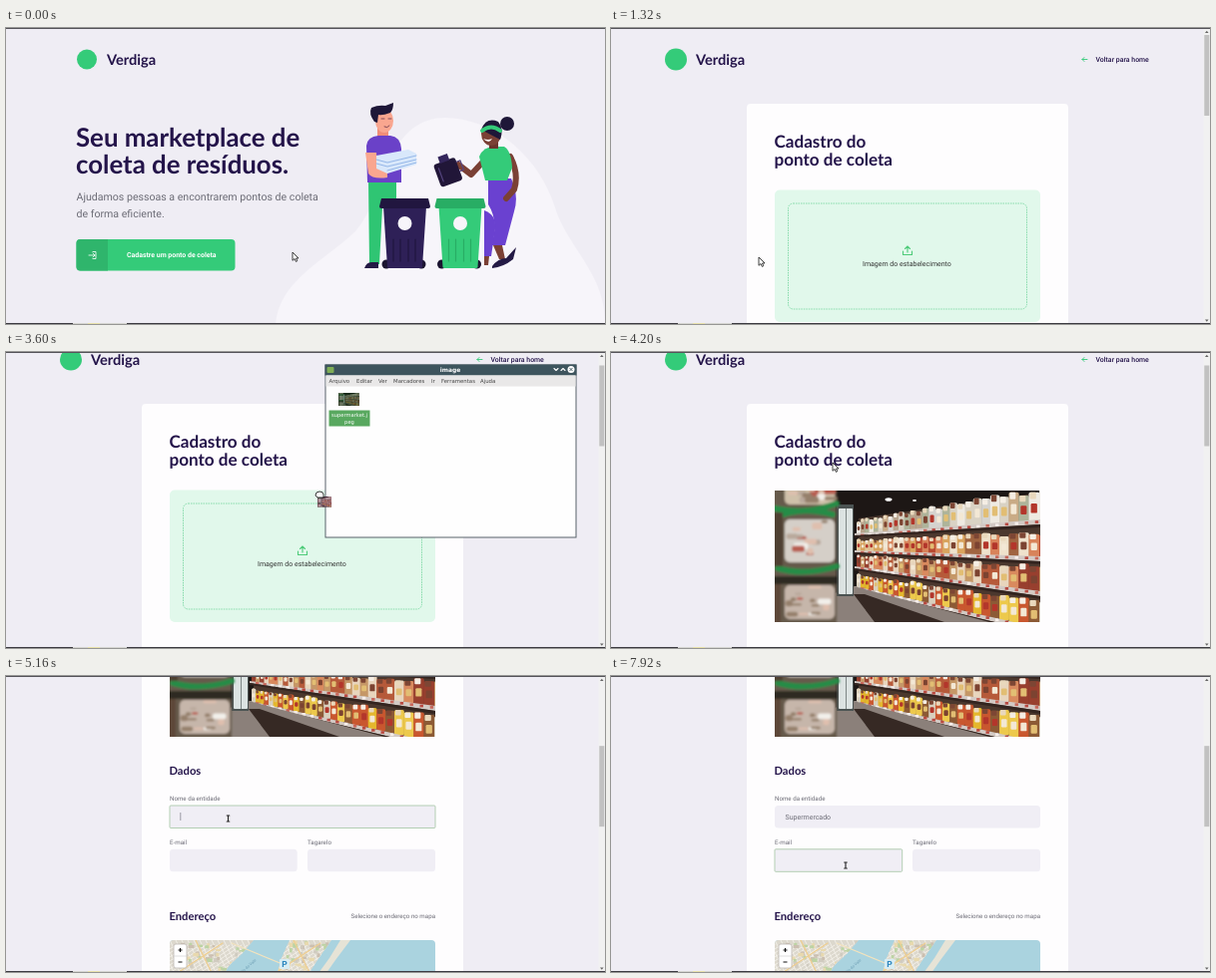
Write an HTML page that moves like this. It is 600 px wide and 297 px high and loops after 8000 ms.

```html
<!DOCTYPE html>
<html lang="pt-BR">
<head>
<meta charset="utf-8">
<title>Ponto de coleta</title>
<style>
  html, body { margin: 0; width: 100%; height: 100%; overflow: hidden; background: #efedf4; }
  svg { display: block; width: 600px; height: 297px; }
  text { font-family: Roboto, sans-serif; font-size: 7px; fill: #6c6c76; white-space: pre; text-rendering: geometricPrecision; }
  .title { font-family: Lato, sans-serif; font-weight: 700; fill: #24144a; }
  .brand { font-size: 14.6px; }
  .hero { font-size: 25.8px; }
  .h1 { font-size: 17.1px; }
  .h2 { font-size: 11.2px; }
  .lead { font-size: 10.6px; }
  .label { font-size: 6.2px; }
  .back { font-weight: 500; font-size: 6.95px; fill: #24144a; }
  .menu text { font-family: "DejaVu Sans", sans-serif; font-size: 5.4px; fill: #444; }
  .menu .name { font-size: 5.2px; fill: #fff; text-anchor: middle; }
  .menu .bar { font-size: 6px; font-weight: 700; fill: #fff; text-anchor: middle; }
  .field { fill: #f0eef5; stroke: none; rx: 3.5px; }
  .field.focus { stroke: #b3ceb3; stroke-width: 1; rx: 1px; }
  .line { fill: none; stroke-linecap: round; stroke-linejoin: round; }
</style>
</head>
<body>
<svg viewBox="0 0 600 297">
  <defs>
    <clipPath id="photoClip"><rect width="266" height="132"/></clipPath>
    <clipPath id="mapClip"><rect width="266" height="132" rx="4"/></clipPath>
    <filter id="soft"><feGaussianBlur stdDeviation="1.3"/></filter>
    <g id="photo" clip-path="url(#photoClip)"></g>
  </defs>
  <rect width="600" height="297" fill="#efedf4"/>

  <g id="home">
    <path d="M270 297C274 252 322 232 350 204C380 172 378 91 440 90C492 91 535 132 550 180C562 220 600 245 600 297Z" fill="#f7f5fa"/>
    <circle cx="81" cy="31.5" r="10" fill="#34cb79"/>
    <text class="title brand" x="101" y="36.5">Verdiga</text>
    <text class="title hero" x="70" y="119">Seu marketplace de</text>
    <text class="title hero" x="70" y="146">coleta de resíduos.</text>
    <text class="lead" x="70.5" y="173">Ajudamos pessoas a encontrarem pontos de coleta</text>
    <text class="lead" x="70.5" y="189.5">de forma eficiente.</text>
    <rect id="button" x="70.5" y="212" width="159" height="31.5" rx="4" fill="#34cb79"/>
    <path d="M102 212H74.5a4 4 0 0 0-4 4v23.5a4 4 0 0 0 4 4H102Z" fill="#2fb56c"/>
    <path class="line" d="M83 228h6m-2-2 2 2-2 2M87 224.5h3v7h-3" stroke="#fff" stroke-width=".8"/>
    <text x="121" y="230.3" style="font-size:6.95px;font-weight:700;fill:#fff">Cadastre um ponto de coleta</text>

    <g id="man">
      <path d="M363 153H391V180H377L374 237H364Z" fill="#2fc573"/>
      <path d="M359 241Q361 235 366 235H373V241Z" fill="#241a45"/>
      <path d="M372 98h11v14h-11z" fill="#f08d78"/>
      <path d="M361 118Q362 109 373 108H385Q395 109 396 121V155H362Z" fill="#6a41c8"/>
      <ellipse cx="379" cy="93" rx="9" ry="12" fill="#f9a68f"/>
      <path d="M369 94Q363 86 366 80Q373 77 380 78L388 75Q388 82 385 85Q377 88 373 87L372 95Z" fill="#1e1738"/>
      <path class="line" d="M376 91h3m4 0h3M379 99q3 2 5-1" stroke="#633047" stroke-width=".8"/>
      <path d="M360 125H371L372 140 382 143V150Q367 152 363 146Z" fill="#f9a68f"/>
      <path d="M371 128 403 122 411 126V137L382 146 371 141Z" fill="#d9e8fb"/>
      <path class="line" d="M371 132 382 135 411 128M371 136 382 139 411 132M382 143 411 135" stroke="#82a9e2" stroke-width=".8"/>
    </g>
    <g id="woman">
      <path d="M483 151H506Q514 168 509 184L500 218H486Q494 194 483 177Z" fill="#6a41d0"/>
      <path d="M479 183Q491 187 490 201L486 229H479Z" fill="#6a41d0"/>
      <path d="M488 218h9l3 14h-6zM479 229h5l-1 9h-4z" fill="#7b4035"/>
      <path d="M487 239Q493 231 501 231L511 220 508 232Q498 240 487 241Z" fill="#241a45"/>
      <path class="line" d="M478 134 466 147 453 137M505 129Q514 146 509 162L501 171" stroke="#7b4035" stroke-width="6"/>
      <path d="M474 129Q478 119 489 119H499Q506 123 507 140L502 153H480Z" fill="#34cb79"/>
      <path d="M484 113h9v8h-9z" fill="#6a342c"/>
      <circle cx="502" cy="96" r="7" fill="#1e1738"/>
      <ellipse cx="486" cy="106" rx="10" ry="12" fill="#7b4035"/>
      <path d="M476 102Q481 89 493 94Q499 101 495 112Z" fill="#1e1738"/>
      <path class="line" d="M477 103Q486 96 495 103" stroke="#34cb79" stroke-width="4"/>
      <path d="M478 111q5 2 9 0-3 6-9 0Z" fill="#fff"/>
      <g transform="rotate(-20 442 144)">
        <rect x="431" y="133" width="23" height="24" rx="3" fill="#211638"/>
        <path d="M438 127h10v7h-10z" fill="#34265c"/>
        <path class="line" d="M454 138h4v10h-4M435 138v14" stroke="#54447e" stroke-width="1.2"/>
      </g>
    </g>
    <g id="bins"></g>
  </g>

  <g id="form">
    <g id="page">
      <circle cx="65" cy="31.5" r="11" fill="#34cb79"/>
      <text class="title brand" x="85" y="36.5">Verdiga</text>
      <path class="line" d="M477 31.5h-5m2-2-2 2 2 2" stroke="#34cb79" stroke-width=".9"/>
      <text class="back" x="485.5" y="34">Voltar para home</text>
      <rect x="136" y="76" width="322" height="700" rx="4" fill="#fefdfe"/>
      <text class="title h1" x="163.5" y="119.5">Cadastro do</text>
      <text class="title h1" x="163.5" y="138">ponto de coleta</text>
      <g id="upload">
        <rect x="164" y="162.5" width="266" height="132.5" rx="5" fill="#e1f8eb"/>
        <rect x="177.5" y="176" width="239" height="106" rx="5" fill="none" stroke="#6fd39b" stroke-width=".8" stroke-dasharray="1.5 1"/>
        <path class="line" d="M292.5 224v3.5h9V224M297 225v-6m-2.5 2.5 2.5-2.5 2.5 2.5" stroke="#4ecb79" stroke-width="1.1"/>
        <text x="252" y="238.5" style="fill:#333">Imagem do estabelecimento</text>
      </g>
      <use id="picture" href="#photo" x="164" y="163"/>
      <text class="title h2" x="163.5" y="333">Dados</text>
      <text class="label" x="164" y="359">Nome da entidade</text>
      <rect class="field" id="entity" x="164" y="364" width="266" height="22.5"/>
      <text id="typed" x="174.5" y="377.7"></text>
      <path id="caret" d="M0 371v8" stroke="#777783" stroke-width=".7"/>
      <text class="label" x="164" y="402.7">E-mail</text>
      <rect class="field" id="email" x="164" y="407.8" width="127.7" height="22.5"/>
      <text class="label" x="302" y="402.7">Tagarelo</text>
      <rect class="field" x="302" y="407.8" width="128" height="22.5"/>
      <text class="title h2" x="163.5" y="478.5">Endereço</text>
      <text class="label" x="430" y="477" text-anchor="end">Selecione o endereço no mapa</text>
      <g id="map" transform="translate(164 499)" clip-path="url(#mapClip)"></g>
    </g>
    <rect x="593.5" width="6.5" height="297" fill="#f1f1f1"/>
    <path d="M595 5l1.8-2.2L598.6 5zM595 292.5l1.8 2.2 1.8-2.2z" fill="#666"/>
    <rect id="thumb" x="594.3" y="7" width="5" height="81" fill="#c1c1c1"/>
  </g>

  <g id="files" class="menu">
    <rect x="320" y="13" width="251" height="173" fill="#fefefe" stroke="#59636a" stroke-width="1"/>
    <rect x="319.5" y="12.5" width="252" height="11" fill="#3d545d"/>
    <rect x="321.5" y="15" width="7" height="6" rx="1" fill="#7fae56"/>
    <text class="bar" x="445" y="19.5">image</text>
    <path class="line" d="M549 16.5l2 2 2-2M556 18.5l2-2 2 2" stroke="#fff" stroke-width="1.1"/>
    <circle cx="566" cy="17.5" r="3.5" fill="#fff"/>
    <path class="line" d="M564.7 16.2l2.6 2.6m0-2.6-2.6 2.6" stroke="#3d545d" stroke-width=".9"/>
    <rect x="320.5" y="23.5" width="250" height="11" fill="#e9e8e8"/>
    <g id="menuItems"></g>
    <use href="#photo" transform="translate(333 41) scale(.079 .098)"/>
    <rect x="333" y="41" width="21" height="13" fill="#123b1c" opacity=".5"/>
    <rect x="323.5" y="58.5" width="41" height="16" fill="#58a85f"/>
    <text class="name" x="344" y="65">supermarket.j</text>
    <text class="name" x="344" y="71.5">peg</text>
  </g>

  <g id="ghost">
    <use href="#photo" transform="translate(-1 -1) scale(.053 .08)"/>
    <rect x="-1" y="-1" width="14" height="10.5" fill="#8b4a7a" opacity=".35"/>
  </g>
  <path id="arrow" d="M0 0V8.3L2 6.5 3.4 9.4 4.8 8.7 3.5 6H6Z" fill="#fff" stroke="#111" stroke-width=".8"/>
  <path id="beam" class="line" d="M-1.3-3h2.6M0-3v6M-1.3 3h2.6" stroke="#222" stroke-width="1.1"/>
  <path id="grab" d="M-4 0Q-4-4 0-4T4-1V2H-2Z" fill="#fff" stroke="#222" stroke-width=".9"/>

  <rect width="600" height="1" fill="#55545a"/>
  <rect y="296" width="600" height="1" fill="#3d3c42"/>
  <rect x="67" y="296" width="54" height="1" fill="#d6d6d2"/>
  <rect x="82" y="296" width="12" height="1" fill="#e9e2ac"/>
</svg>
<script>
const $ = id => document.getElementById(id);
const LOOP = 8000, STEP = 120;

function seeded(seed) {
  return () => (seed = (seed * 16807) % 2147483647) / 2147483647;
}
const poly = (points, fill) => `<polygon points="${points}" fill="${fill}"/>`;
const box = (x, y, w, h, fill, r = 0) => `<rect x="${x}" y="${y}" width="${w}" height="${h}" rx="${r}" fill="${fill}"/>`;

function drawBin(x, body, lid) {
  return `<g transform="translate(${x} 170)">
    <circle cx="7" cy="67" r="4.5" fill="#1b1430"/><circle cx="42" cy="67" r="4.5" fill="#1b1430"/>
    <path d="M4 9H47L43 70Q43 71 41 71H10Q8 71 8 70Z" fill="${body}"/>
    <path d="M2 1H49L51 9Q51 11 49 11H2Q0 11 0 9Z" fill="${lid}"/>
    <path class="line" d="M14 42v22m7-22v22m8-22v22m7-22v22" stroke="${lid}" stroke-width="1.2"/>
    <circle cx="25.5" cy="26" r="7" fill="#f7f5fa"/></g>`;
}

// Perspective shelves: each row has a left and right height, a depth of goods and its own colours.
function drawPhoto() {
  const rand = seeded(41);
  const pick = list => list[Math.floor(rand() * list.length)];
  const rows = [
    { left: 43, right: 29, tall: 1, hues: ['#d9d2c4', '#aeb49a', '#eeeae2', '#c9ab86', '#d5d3cf', '#b9a58e'] },
    { left: 60, right: 66, tall: .78, hues: ['#d9a45e', '#b84a32', '#efe2cc', '#a06440', '#e3c696', '#d8835a'] },
    { left: 76, right: 101, tall: .8, hues: ['#b65a3a', '#d98a5e', '#e8d5bd', '#983f2e', '#c59767'] },
    { left: 96, right: 138, tall: .85, hues: ['#e4b72d', '#c9572f', '#edc94c', '#8c5a35', '#d9d0be'] }
  ];
  let out = box(0, 0, 266, 132, '#1d1715');
  out += poly('84,28 266,2 266,132 84,132', '#4b382e');
  for (const [x, y, r] of [[114, 9, 3.5], [140, 10, 2]])
    out += `<ellipse cx="${x}" cy="${y}" rx="${r}" ry="${r / 2}" fill="#fff"/>`;
  for (const { left, right, tall, hues } of rows) {
    const base = x => left + (right - left) * (x - 84) / 182;
    for (let x = 82; x < 266;) {
      const far = (x - 82) / 184, w = 4 + far * 7, y = base(x);
      const h = (14 + far * 18) * tall * (.85 + rand() * .2);
      out += box(x, y - h, w + .4, h + 2, pick(hues), 1.8);
      out += box(x + w * .1, y - h, w * .6, h * .24, pick(['#f5eee4', '#7d4634', '#e9d8bc']), 1);
      out += box(x + w * .2, y - h * .6, w * .6, h * .34, pick(['#f3e8d5', '#b3362b', '#e2be73', '#7c4331']), 1.2);
      x += w;
    }
    out += poly(`80,${left} 266,${right} 266,${right + 5} 80,${left + 2}`, '#d3cac5');
    for (let x = 86; x < 264; x += 6 + x / 60)
      out += box(x, base(x) + .8, 3.4, 2.7, pick(['#b84a42', '#f6eeea', '#c7665a']));
    out += poly(`80,${left + 2} 266,${right + 5} 266,${right + 8} 80,${left + 4}`, '#33241f');
  }
  out += poly('52,106 79,96 215,132 52,132', '#8b807a') + poly('79,104 90,104 170,132 100,132', '#362924');
  out += box(62, 14, 17, 92, '#4b5352') + box(64, 18, 14, 86, '#dce3e2', 1) + box(71, 18, 1, 86, '#7e8786');
  out += '<g filter="url(#soft)">' + box(-3, -3, 65, 140, '#665a4b');
  for (const [top, height, tone] of [[-8, 22, '#cfc1aa'], [29, 43, '#d5cfc8'], [95, 34, '#c6b6aa']]) {
    out += box(10, top, 50, height, tone, 5);
    for (let i = 0; i < 14; i++)
      out += box(10 + rand() * 40, top + rand() * (height - 6), 5 + rand() * 10, 2 + rand() * 5, pick(['#b85d51', '#dfbfae', '#f2efea', '#95806c', '#b9a99c']), 2);
  }
  out += `<path class="line" d="M0 18Q30 25 62 13M0 27Q26 15 58 24M3 78Q30 86 62 76" stroke="#278c46" stroke-width="6"/>`;
  out += box(-2, 86, 64, 8, '#2f2a23') + box(-3, 22, 11, 54, '#4f4032') + box(-3, 94, 9, 40, '#5d4638') + '</g>';
  return out;
}

function drawMap() {
  const rand = seeded(9);
  let out = box(0, 0, 266, 132, '#aad3df');
  const land = (points, id, x0, x1) => {
    out += `<clipPath id="${id}"><polygon points="${points}"/></clipPath><g clip-path="url(#${id})">` + box(0, 0, 266, 132, '#dcd8cd');
    for (let i = -60; i < 180; i += 6)
      out += `<path class="line" d="M${i} 0l30 60M${i} 45l60-40" stroke="#f4f1ea" stroke-width=".9"/>`;
    for (let i = 0; i < 70; i++)
      out += box(x0 + rand() * (x1 - x0), rand() * 40, 2 + rand() * 4, 1.5 + rand() * 3, ['#cbbfb0', '#bcd3a4', '#e8d9ae', '#d0cbc0'][i % 4]);
    out += `<path class="line" d="M${x0 - 8} 38 ${x0 + 45} 3M${x0 + 18} 0 ${x0 + 40} 45" stroke="#efcf92" stroke-width="1.3"/></g>`;
  };
  land('0,0 84,0 72,14 60,25 50,40 0,40', 'westBank', 8, 85);
  land('120,0 162,0 148,20 135,40 106,40 112,18', 'eastBank', 106, 160);
  out += poly('171,0 181,0 166,20 152,40 144,40 160,18', '#e6e3d6');
  out += `<path class="line" d="M62 3 120 27" stroke="#f3e3bd" stroke-width="1.2"/>
    <text x="72" y="34" transform="rotate(-42 72 34)" style="font-size:4px;fill:#6e9fb5">Rio do Vale</text>
    <rect x="110" y="19" width="10" height="10" rx="1" fill="#d9edf3"/>
    <text x="112.3" y="27.2" style="font-size:8.5px;font-weight:700;fill:#2984bd">P</text>
    <rect x="4" y="4" width="13" height="24" rx="2" fill="#fff" stroke="#bbb7b2" stroke-width=".8"/>
    <path d="M4 16H17" stroke="#ccc" stroke-width=".6"/>
    <path d="M8.5 10h4M10.5 8v4M8.5 22h4" stroke="#111" stroke-width="1.1"/>`;
  return out;
}

$('bins').innerHTML = drawBin(374, '#2e2057', '#21163f') + drawBin(429.5, '#34cb79', '#28ad64');
$('photo').innerHTML = drawPhoto();
$('map').innerHTML = drawMap();
$('menuItems').innerHTML = [['Arquivo', 323.5], ['Editar', 351], ['Ver', 373], ['Marcadores', 388], ['Ir', 426], ['Ferramentas', 436], ['Ajuda', 475]]
  .map(([label, x]) => `<text x="${x}" y="31">${label}</text>`).join('');

// Rows are time followed by the values at that time.
const pointer = [
  [0, 287, 225], [120, 287, 225], [720, 148, 230], [1800, 148, 230], [2400, 225, 280], [2640, 240, 282],
  [3120, 345, 49], [3240, 345, 49], [3600, 311, 144], [3840, 232, 190], [3960, 228, 185],
  [4320, 219, 74], [4680, 219, 74], [4920, 222.5, 143], [7200, 222.5, 143], [7440, 235, 190]
];
const scrolling = [[1800, 0], [2040, 24], [4320, 24], [4560, 129], [4800, 234]];
const typing = [[5520, 0], [6120, 5], [7080, 12]];

function sample(track, t) {
  const next = track.findIndex(row => row[0] > t);
  if (next === 0) return track[0].slice(1);
  if (next < 0) return track[track.length - 1].slice(1);
  const a = track[next - 1], b = track[next], k = (t - a[0]) / (b[0] - a[0]);
  return a.slice(1).map((v, i) => v + (b[i + 1] - v) * k);
}
const show = (id, on) => { $(id).style.display = on ? '' : 'none'; };
const within = (t, from, to) => t >= from && t < to;

function render(time) {
  const t = Math.floor((time % LOOP) / STEP) * STEP;
  const [x, y] = sample(pointer, t);
  const [scroll] = sample(scrolling, t);
  const onForm = t >= 1080;

  show('home', !onForm);
  show('form', onForm);
  $('button').setAttribute('fill', x < 229 ? '#2fb86e' : '#34cb79');
  $('page').setAttribute('transform', `translate(0 ${-scroll})`);
  $('thumb').setAttribute('y', 7 + scroll * .27);

  show('files', within(t, 2760, 4080));
  show('upload', t < 3960);
  show('picture', t >= 3960);

  const inEntity = within(t, 5040, 7440), inEmail = t >= 7440;
  $('entity').classList.toggle('focus', inEntity);
  $('email').classList.toggle('focus', inEmail);
  const typed = $('typed');
  typed.textContent = 'Supermercado'.slice(0, Math.floor(sample(typing, t)[0] + 1e-6));
  const busy = within(t, 5640, 7080);
  const blink = Math.floor((t - (inEmail ? 7440 : 5040)) / 480) % 2 === 0;
  show('caret', (inEntity || inEmail) && (busy || blink));
  const caretX = inEmail ? 174.5 : 174.8 + (typed.textContent ? typed.getComputedTextLength() : 0);
  $('caret').setAttribute('transform', `translate(${caretX} ${inEmail ? 44 : 0})`);

  const dragging = within(t, 3240, 3960), overField = t >= 4920;
  for (const [id, on] of [['ghost', dragging], ['grab', dragging], ['arrow', !dragging && !overField], ['beam', overField]]) {
    show(id, on);
    const dx = id === 'ghost' ? 2 : id === 'grab' ? 3 : 0;
    $(id).setAttribute('transform', `translate(${x + dx} ${y + (id === 'ghost' ? 2 : 0)})`);
  }
}

const start = performance.now();
function tick() {
  render(performance.now() - start);
  requestAnimationFrame(tick);
}
tick();
</script>
</body>
</html>
```
